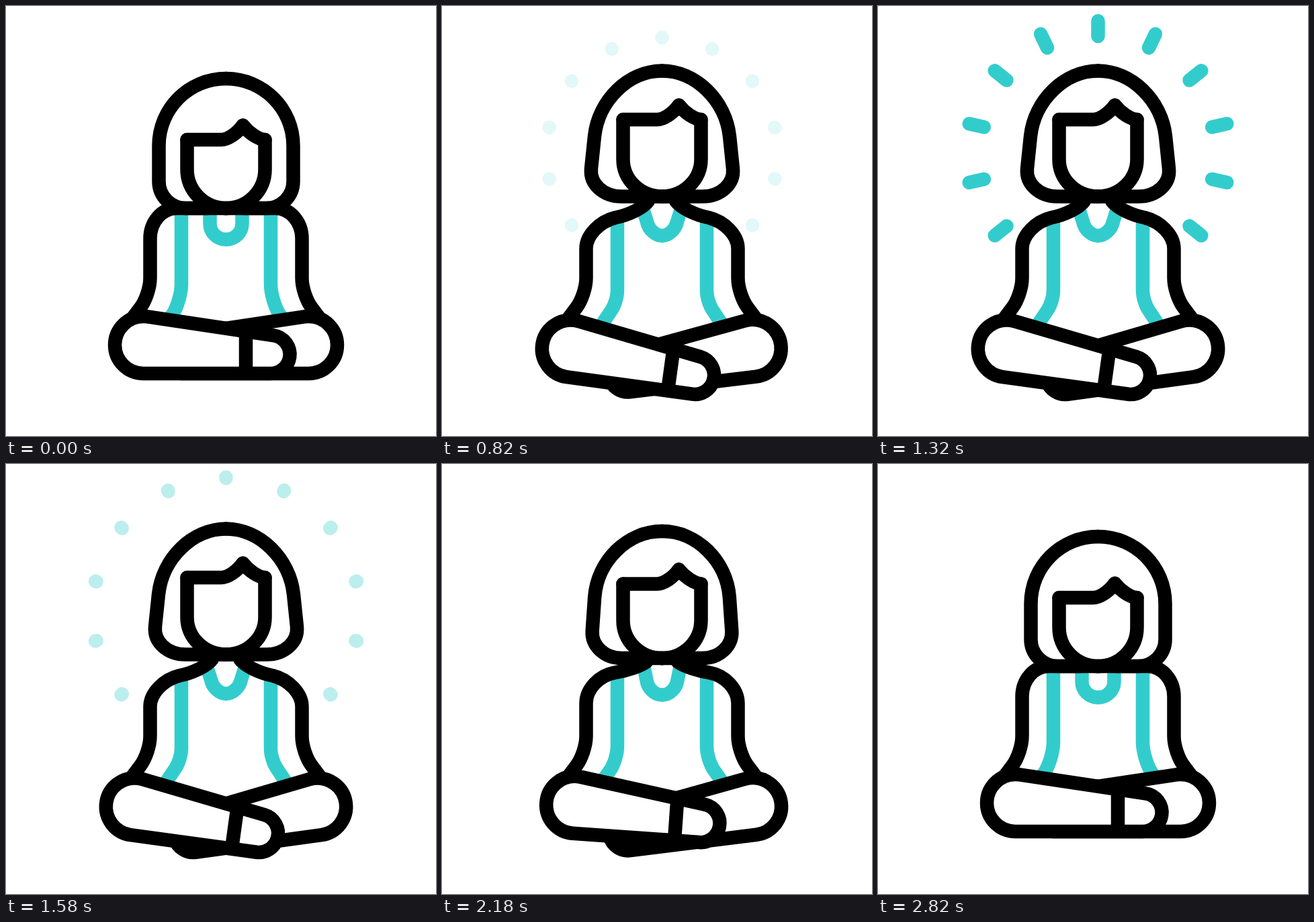
Recreate the animation shown at these times as an HTML page with a canvas. Size 640x640 px, loop 3600 ms.

```html
<!DOCTYPE html>
<html lang="en">
<head>
<meta charset="utf-8">
<title>Meditation</title>
<style>
  html, body { margin: 0; width: 100%; height: 100%; overflow: hidden; background: #fff; }
  canvas { display: block; width: 100vmin; height: 100vmin; }
</style>
</head>
<body>
<canvas width="640" height="640"></canvas>
<script>
const ctx = document.querySelector('canvas').getContext('2d');
const LOOP = 3600, AXIS = 327.5, LINE = 20.5;
const BLACK = '#000', TEAL = '#33cccc';

const lerp = (a, b, p) => a + (b - a) * p;
const ramp = (t, from, to) => Math.min(1, Math.max(0, (t - from) / (to - from)));
const smooth = u => u * u * (3 - 2 * u);
const easeOut = u => 1 - (1 - u) ** 3;
const ease = (t, from, to) => smooth(ramp(t, from, to));

// How far each part has moved from the low pose (0) to the tall pose (1).
const rise = t => ease(t, 60, 640) - ramp(t, 1890, 2820);
const leftLeg = t => ease(t, 0, 840) - ease(t, 1860, 2520);
const rightLeg = t => ease(t, 300, 960) - ease(t, 2060, 2740);

// Chainable path; bend() rounds a corner on the way to its end point.
class Pen {
  constructor(x, y) {
    ctx.beginPath();
    ctx.moveTo(x, y);
    this.x = x;
    this.y = y;
  }
  line(x, y) {
    ctx.lineTo(x, y);
    return this.at(x, y);
  }
  bend(cx, cy, x, y, k = .553) {
    ctx.bezierCurveTo(lerp(this.x, cx, k), lerp(this.y, cy, k),
      lerp(x, cx, k), lerp(y, cy, k), x, y);
    return this.at(x, y);
  }
  at(x, y) {
    this.x = x;
    this.y = y;
    return this;
  }
}

function mirror(draw) {
  ctx.save();
  ctx.translate(2 * AXIS, 0);
  ctx.scale(-1, 1);
  draw();
  ctx.restore();
}

function pair(color, cap, half) {
  ctx.strokeStyle = color;
  ctx.lineCap = cap;
  const draw = () => { half(); ctx.stroke(); };
  draw();
  mirror(draw);
}

function shirt(p) {
  pair(TEAL, 'butt', () => new Pen(261, 301 + 15 * p)
    .line(261, 414 + 10 * p)
    .bend(261, 438 + 2 * p, 248 + 4 * p, 459 - 6 * p)
    .line(240 - 2 * p, 468 + 6 * p));
  pair(TEAL, 'butt', () => new Pen(303.5 - 4.5 * p, 301 + p)
    .line(303.5 + 1.5 * p, 324 - 3 * p)
    .bend(303.5 + 6 * p, 347.5 - 5.5 * p, AXIS, 347.5 - 5.5 * p)
    .line(AXIS + 1, 347.5 - 5.5 * p));
}

function body(p) {
  const side = 214.5;
  pair(BLACK, 'round', () => new Pen(300 + 6.5 * p, 301 - 10 * p)
    .bend(280 + 14 * p, 301 + 7 * p, 254 + 4 * p, 301 + 14 * p)
    .bend(side, 301 + 25 * p, side, 346 + 15 * p)
    .line(side, 405)
    .bend(side, 430, 200, 449)
    .line(188, 465));
}

function head(p) {
  const top = 108 - 11.5 * p, chin = 301 - 17.5 * p, brow = 199 - 30 * p;
  const hair = 227.5, cheek = 269.5;
  pair(BLACK, 'round', () => new Pen(AXIS, top)
    .bend(hair + 10 * p, top, hair - .5 * p, 208 - 14 * p)
    .line(hair - 5.5 * p, 261 - 19 * p)
    .bend(hair - 9.5 * p, chin, hair + 40, chin)
    .line(AXIS, chin));
  pair(BLACK, 'round', () => new Pen(cheek, brow)
    .line(cheek, 243 - 15 * p)
    .bend(cheek, chin, AXIS, chin));
  new Pen(cheek, brow)
    .line(320, brow)
    .bend(338, brow, 352.5, brow - 21.5)
    .bend(368, brow - 1, 2 * AXIS - cheek, brow);
  ctx.stroke();
}

// A leg is the hull of a knee circle and a foot circle.
function leg(p) {
  const kx = lerp(204.5, 191.3, p), ky = lerp(504.5, 510, p), kr = 42.5;
  const fx = lerp(394, 376.5, p), fy = lerp(518.5, 549.5, p), fr = 28.5;
  const dir = Math.atan2(fy - ky, fx - kx);
  const lean = Math.acos((kr - fr) / Math.hypot(fx - kx, fy - ky));
  ctx.beginPath();
  ctx.arc(kx, ky, kr, dir + lean, dir - lean);
  ctx.arc(fx, fy, fr, dir - lean, dir + lean);
  ctx.closePath();
  ctx.fill();
  ctx.stroke();

  // Cuff
  ctx.save();
  ctx.translate(fx, fy);
  ctx.rotate(dir + lean - Math.PI / 2);
  ctx.lineCap = 'butt';
  new Pen(-37, -33).line(-37, fr);
  ctx.stroke();
  ctx.restore();
}

function rays(t) {
  const inner = 172 + 2 * ramp(t, 1080, 1320) + 25 * ease(t, 1320, 1620);
  const outer = 172 + 23 * easeOut(ramp(t, 820, 1160)) + 5 * ramp(t, 1160, 1620);
  ctx.save();
  ctx.globalAlpha = ramp(t, 780, 1080) * (1 - ramp(t, 1480, 1630));
  ctx.strokeStyle = TEAL;
  ctx.lineCap = 'round';
  ctx.beginPath();
  for (let k = -5; k <= 5; k++) {
    const a = k * Math.PI / 7, s = Math.sin(a), c = Math.cos(a);
    ctx.moveTo(AXIS + inner * s, 219 - inner * c);
    ctx.lineTo(AXIS + (outer + .01) * s, 219 - (outer + .01) * c);
  }
  ctx.stroke();
  ctx.restore();
}

function render(t) {
  const p = rise(t);
  ctx.fillStyle = '#fff';
  ctx.fillRect(0, 0, 640, 640);
  ctx.lineWidth = LINE;
  ctx.lineJoin = 'round';
  rays(t);
  shirt(p);
  body(p);
  head(p);
  mirror(() => leg(rightLeg(t)));
  leg(leftLeg(t));
}

const start = performance.now();
function tick() {
  render((performance.now() - start) % LOOP);
  requestAnimationFrame(tick);
}
tick();
</script>
</body>
</html>
```
